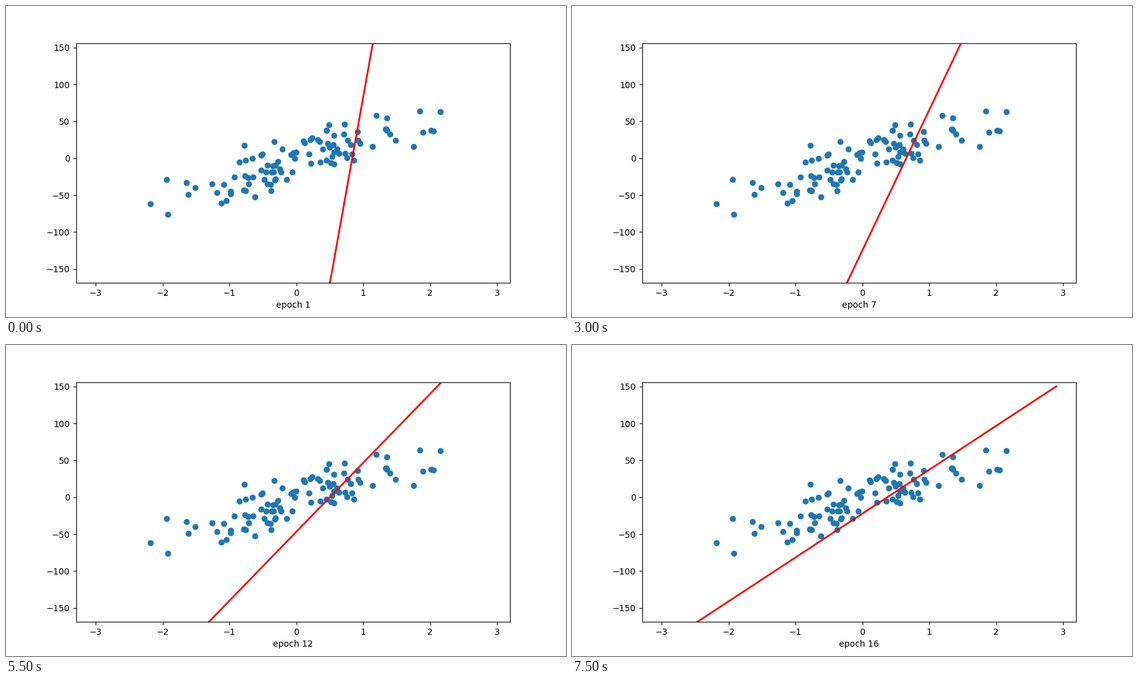
Write a matplotlib script that moves like this. It is 900 px wide and 500 px high and loops after 8000 ms.

```python
import numpy as np
import matplotlib.pyplot as plt
from matplotlib.animation import FuncAnimation

EPOCHS = 16
INTERVAL = 500
RATE = 0.001

# Noisy linear data
rng = np.random.RandomState(13)
x = rng.standard_normal(100)
y = 100 * rng.uniform() * x
y += rng.normal(scale=20, size=100)


def descend(m, b):
    """Return slope and intercept after each gradient descent step."""
    path = []
    for _ in range(EPOCHS):
        err = y - m * x - b
        m, b = m + 2 * RATE * np.sum(err * x), b + 2 * RATE * np.sum(err)
        path.append((m, b))
    return path


fits = descend(600.0, -520.0)
line_x = np.arange(-3, 3, 0.1)

fig, ax = plt.subplots(figsize=(9, 5), dpi=100)
ax.scatter(x, y)
ax.set_xlim(-3.295, 3.195)
ax.set_ylim(-168.75, 155.75)
line, = ax.plot([], [], "r-", linewidth=2)


def update(i):
    m, b = fits[i]
    line.set_data(line_x, m * line_x + b)
    ax.set_xlabel(f"epoch {i + 1}")
    return line,


anim = FuncAnimation(fig, update, frames=EPOCHS, interval=INTERVAL,
                     repeat=True, repeat_delay=0)
plt.show()
```
